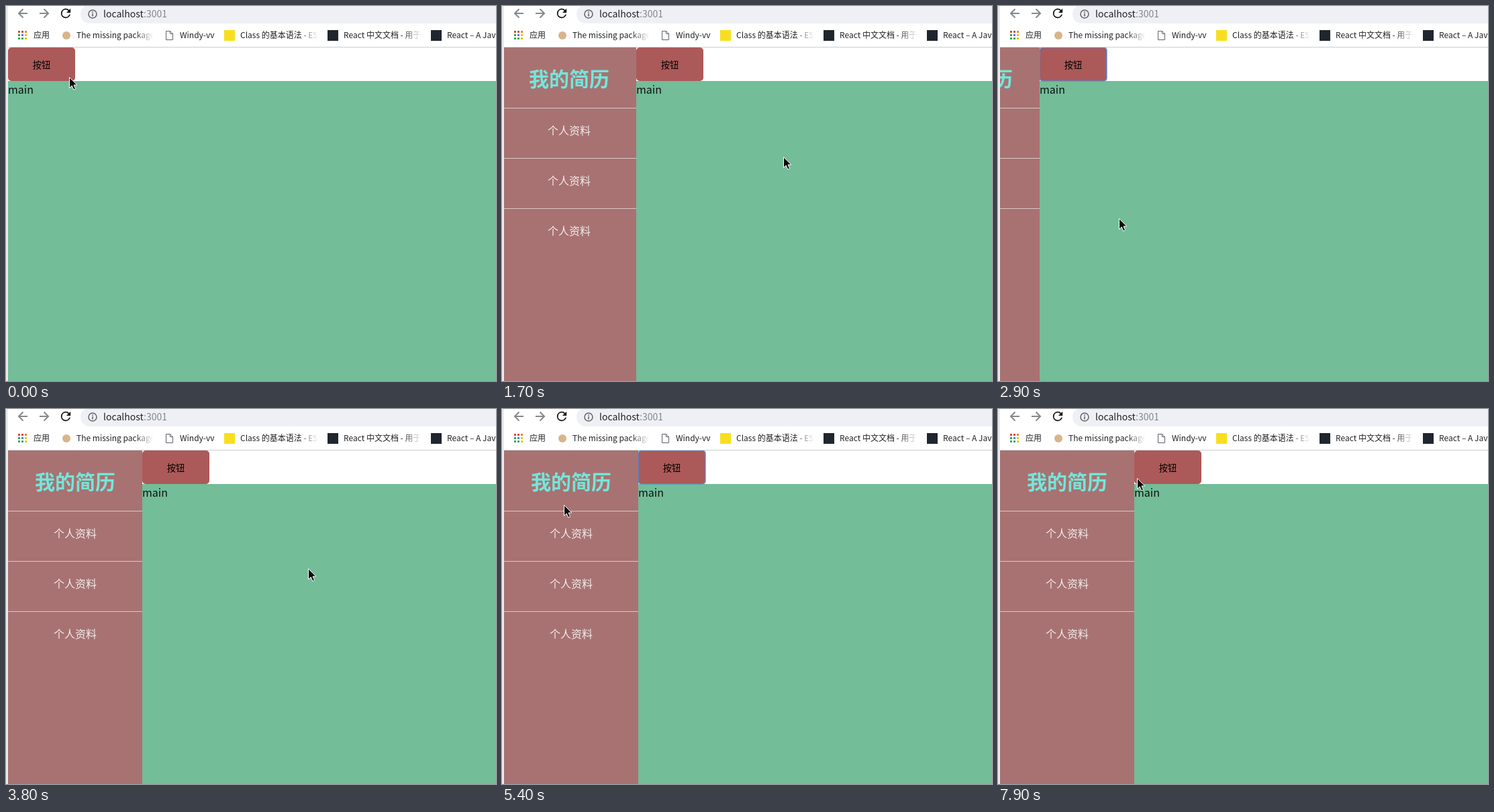
An HTML page for the animation above (8 s loop, 730 px wide and 560 px high).

```html
<!DOCTYPE html>
<html lang="zh-CN">
<head>
<meta charset="utf-8">
<title>Sliding sidebar</title>
<style>
html, body { margin: 0; width: 100%; height: 100%; overflow: hidden; background: #fff; }
svg { display: block; width: 730px; height: 560px; }
text { font-family: "Noto Sans CJK SC", "Noto Sans CJK", "Noto Sans", sans-serif; white-space: pre; }
.mark { font-size: 12px; fill: #202124; }
.nav { font-size: 16px; fill: #f1ecec; text-anchor: middle; }
.title { font-size: 30px; font-weight: 700; fill: #74e6da; text-anchor: middle; }
.icon { fill: none; stroke: #85888c; stroke-width: 2; }
</style>
</head>
<body>
<svg viewBox="0 0 730 560">
  <defs>
    <clipPath id="page"><rect x="3" y="62" width="727" height="498"/></clipPath>
    <linearGradient id="fade">
      <stop offset="0" stop-color="#fff" stop-opacity="0"/>
      <stop offset=".6" stop-color="#fff"/>
    </linearGradient>
  </defs>

  <!-- browser bar -->
  <path class="icon" d="M32 11H19M25.5 4.5L19 11l6.5 6.5M50 11h13M56.500 4.500L63 11l-6.500 6.500"/>
  <path transform="translate(78.200 .2) scale(.9)" fill="#111" d="M17.650 6.350A7.960 7.960 0 0 0 12 4a8 8 0 1 0 7.730 10h-2.080A6 6 0 1 1 12 6c1.660 0 3.140.69 4.220 1.780L13 11h7V4z"/>
  <rect x="111" y="-2" width="660" height="28" rx="14" fill="#eff0f5"/>
  <circle cx="129" cy="12" r="6" fill="none" stroke="#5f6368" stroke-width="1.500"/>
  <path d="M129 8.200v1.700M129 11v4.500" stroke="#5f6368" stroke-width="1.600"/>
  <text x="145" y="17" font-size="14" fill="#202124">localhost<tspan fill="#80868b">:3001</tspan></text>
  <g id="marks"></g>
  <rect y="61" width="730" height="1" fill="#cdcdcd"/>

  <!-- page -->
  <g clip-path="url(#page)">
    <g id="slide">
      <rect x="-200" y="62" width="200" height="498" fill="#a87272"/>
      <text class="title" x="-100" y="119.500">我的简历</text>
      <g id="nav"></g>
      <rect y="112" width="930" height="448" fill="#73bd99"/>
      <text x="0" y="131" font-size="16" fill="#111">main</text>
      <rect y="62" width="100" height="50" rx="5" fill="#ac5959"/>
      <text x="50" y="93" font-size="13.333" text-anchor="middle">按钮</text>
      <rect id="ring" y="62" width="100" height="50" rx="4" fill="none" stroke="#4a8fd8" stroke-opacity=".85" stroke-width="1.500"/>
    </g>
  </g>
  <rect width="3" height="560" fill="#ebebeb"/>
  <path id="cursor" d="M.5 .5V16.500L4.200 13l2.600 6 2.800-1.200-2.600-5.800H11.800z" fill="#0a0a0a" stroke="#fff" stroke-width="1"/>
</svg>

<script>
const $ = id => document.getElementById(id);
const LOOP = 8000, STEP = 100, SLIDE = 500, WIDTH = 200, LEFT = 3;

// [start, final openness]
const toggles = [[432, 1], [1686, 0], [2800, 1], [3878, 0], [4600, 1]];
const focused = [[400, 1600], [2800, 3800], [4600, 5600]];

// [time, x, y]
const path = [
  [0, 94, 106], [400, 80, 94], [500, 110, 110], [600, 225, 172], [700, 335, 226],
  [800, 392, 252], [1000, 393, 252], [1600, 419, 225], [1700, 419, 225],
  [1800, 214, 160], [2100, 85, 110], [2600, 60, 95], [2800, 60, 95],
  [2900, 180, 317], [3200, 425, 255], [3600, 437, 240], [3800, 450, 238],
  [3900, 450, 238], [4100, 220, 160], [4300, 55, 105], [4400, 50, 98],
  [4600, 50, 98], [5100, 72, 112], [5400, 92, 143], [5800, 84, 130],
  [6000, 84, 130], [6200, 125, 84], [6400, 26, 260], [6600, 56, 424],
  [6700, 56, 424], [6900, 151, 419], [7000, 151, 419], [7200, 74, 159],
  [7300, 78, 215], [7500, 78, 215], [7700, 224, 150], [7900, 207, 103]
];

function drawMarks() {
  const dots = ["#e34133", "#e34133", "#f0803c", "#34a853", "#4285f4", "#fbbc05", "#34a853", "#34a853", "#fbbc05"];
  let out = dots.map((c, i) =>
    `<rect x="${18 + i % 3 * 5}" y="${37 + (i / 3 | 0) * 5}" width="3" height="3" fill="${c}"/>`).join("");
  const label = (x, s, end) => {
    out += `<text class="mark" x="${x}" y="48">${s}</text>`;
    if (end) out += `<rect x="${end - 28}" y="32" width="46" height="24" fill="url(#fade)"/>`;
  };
  const square = (x, c) => out += `<rect x="${x}" y="36" width="16" height="16" fill="${c}"/>`;
  label(41, "应用");
  label(105, "The missing package", 220);
  label(259, "Windy-vv");
  label(349, "Class 的基本语法 - ES", 465);
  label(503, "React 中文文档 - 用于", 619);
  label(657, "React – A Java");
  out += '<circle cx="90" cy="44" r="6" fill="#d9b48c"/>';
  out += '<path d="M238.500 37.500h6l4 4v9h-10zM244.500 37.500v4h4" fill="#fff" stroke="#5f6368"/>';
  square(325, "#f7df1e");
  square(479, "#20262e");
  square(633, "#20262e");
  $("marks").innerHTML = out;
}

function drawNav() {
  $("nav").innerHTML = [0, 75, 150].map(y =>
    `<rect x="-200" y="${152 + y}" width="200" height="1" fill="#dcc6c6"/>` +
    `<text class="nav" x="-100" y="${192 + y}">个人资料</text>`).join("");
}

// cubic-bezier(.25, .1, .25, 1)
function ease(p) {
  if (p <= 0) return 0;
  if (p >= 1) return 1;
  let lo = 0, hi = 1, s;
  for (let i = 0; i < 24; i++) {
    s = (lo + hi) / 2;
    if (.75 * s * (1 - s) + s ** 3 < p) lo = s; else hi = s;
  }
  return .3 * s * (1 - s) ** 2 + 3 * s * s * (1 - s) + s ** 3;
}

function openness(t) {
  const last = toggles.filter(k => k[0] <= t).pop();
  if (!last) return 0;
  const e = ease((t - last[0]) / SLIDE);
  return last[1] ? e : 1 - e;
}

function pointer(t) {
  const i = path.findIndex(k => k[0] > t);
  if (i < 0) return path[path.length - 1].slice(1);
  const a = path[i - 1], b = path[i], p = (t - a[0]) / (b[0] - a[0]);
  return [1, 2].map(n => Math.round(a[n] + (b[n] - a[n]) * p));
}

function render(t) {
  $("slide").setAttribute("transform", `translate(${LEFT + Math.round(WIDTH * openness(t))} 0)`);
  $("ring").style.display = focused.some(([a, b]) => t >= a && t < b) ? "" : "none";
  $("cursor").setAttribute("transform", `translate(${pointer(t)})`);
}

drawMarks();
drawNav();
const start = performance.now();
function tick() {
  const t = (performance.now() - start) % LOOP;
  render(Math.floor(t / STEP) * STEP);
  requestAnimationFrame(tick);
}
tick();
</script>
</body>
</html>
```
